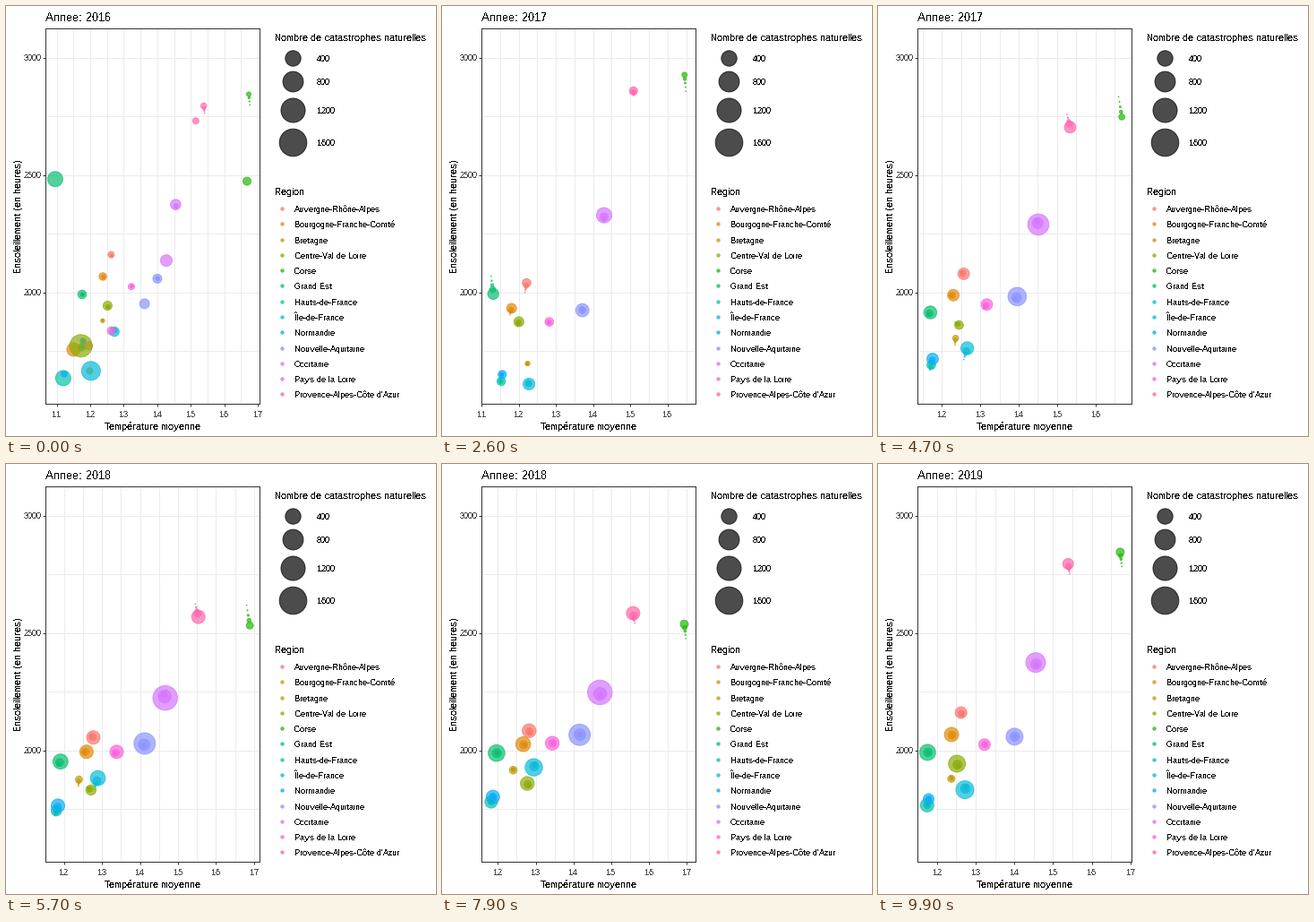
These frames come from a looping animation (480x480 px, 10000 ms). A matplotlib script:

```python
import numpy as np
import matplotlib.pyplot as plt
from matplotlib.animation import FuncAnimation
from matplotlib.ticker import MultipleLocator

SIZE, DPI = 480, 96
PX = 72 / DPI                      # points per pixel
FRAMES, INTERVAL = 100, 100
YEARS = np.arange(2016, 2020)
WAKE = 5                           # shadow length in frames
ALPHA = 0.7
LEFT, RIGHT, TOP, BOTTOM = 44, 283, 25, 444

plt.rcParams.update({
    "font.family": "Liberation Sans",
    "text.hinting": "native",
    "text.hinting_factor": 1,
    "text.antialiased": False,
})

# Key points: temperature (first, peak), sunshine (first three years),
# bubble radius in pixels (first, peak)
REGIONS = {
    "Auvergne-Rhône-Alpes": ((11.95, 12.96), (1773, 2113, 2034), (5, 9)),
    "Bourgogne-Franche-Comté": ((11.5, 12.86), (1757, 1980, 2000), (8, 9)),
    "Bretagne": ((11.98, 12.43), (1666, 1706, 1940), (4, 5)),
    "Centre-Val de Loire": ((11.72, 12.95), (1773, 1903, 1805), (13, 7)),
    "Corse": ((16.68, 17.07), (2474, 3049, 2339), (5, 5)),
    "Grand Est": ((10.95, 12.1), (2483, 1862, 1987), (9, 10)),
    "Hauts-de-France": ((11.19, 11.87), (1635, 1618, 1790), (9, 7)),
    "Île-de-France": ((12.02, 13.1), (1666, 1595, 1990), (11, 10)),
    "Normandie": ((11.22, 11.92), (1653, 1650, 1808), (4, 9)),
    "Nouvelle-Aquitaine": ((13.62, 14.27), (1952, 1917, 2072), (6, 14)),
    "Occitanie": ((14.27, 14.8), (2136, 2381, 2165), (7, 16)),
    "Pays de la Loire": ((12.63, 13.58), (1837, 1885, 2035), (5, 9)),
    "Provence-Alpes-Côte d'Azur": ((15.15, 15.71), (2731, 2893, 2448), (4, 9)),
}


def yearly(temp, sun, radius):
    """Fill in the years between and after the key points."""
    t0, t2 = temp
    t1 = t0 + 0.13 * (14.5 - t0)   # cool regions warm up first
    s0, s1, s2 = sun
    r0, r2 = radius
    return ((t0, t1, t2, (t1 + t2) / 2),
            (s0, s1, s2, 0.6 * s1 + 0.4 * s2 + 80),
            (r0, 0.6 * r2, r2, (r0 + r2) / 2))


# Axes: region, quantity, year
DATA = np.array([yearly(*keys) for keys in REGIONS.values()])


def hue_color(hue, chroma=100, lum=65):
    """Polar CIE-LUV colour as RGBA."""
    h = np.radians(hue)
    u = chroma * np.cos(h) / (13 * lum) + 0.1978
    v = chroma * np.sin(h) / (13 * lum) + 0.4683
    y = ((lum + 16) / 116) ** 3
    xyz = [9 * y * u / (4 * v), y, y * (12 - 3 * u - 20 * v) / (4 * v)]
    rgb = np.clip(np.dot([[3.2406, -1.5372, -0.4986],
                          [-0.9689, 1.8758, 0.0415],
                          [0.0557, -0.2040, 1.0570]], xyz), 0.0031308, 1)
    return (*np.clip(1.055 * rgb ** (1 / 2.4) - 0.055, 0, 1), ALPHA)


COLORS = [hue_color(15 + 360 * i / len(REGIONS)) for i in range(len(REGIONS))]


def area(radius, scale=1.0):
    """Marker area for an outer radius in pixels; the outline never shrinks."""
    inner = 0.354 + (radius - 0.85) * scale
    return (2 * inner * PX) ** 2


fig = plt.figure(figsize=(SIZE / DPI, SIZE / DPI), dpi=DPI, facecolor="white")

# Page in pixel coordinates for titles and legends
page = fig.add_axes([0, 0, 1, 1])
page.set(xlim=(0, SIZE), ylim=(SIZE, 0))
page.axis("off")


def label(x, y, text, px, **kw):
    return page.text(x, y, text, fontsize=px * PX, va="baseline", **kw)


def dots(ax, x, y, s, colors, **kw):
    return ax.scatter(x, y, s=s, facecolors=colors, edgecolors=colors,
                      linewidths=PX, **kw)


title = label(44, 17, "", 13)
label(163.5, 473, "Température moyenne", 11, ha="center")
label(17, 235, "Ensoleillement (en heures)", 11, ha="center", rotation=90,
      rotation_mode="anchor")

label(300, 39, "Nombre de catastrophes naturelles", 11)
y = 57.5
for count in range(400, 2000, 400):
    r = 0.33 * count ** 0.5 + 2.6
    dots(page, [320], [y], area(r), [(0, 0, 0, ALPHA)])
    label(347, y + 4.5, str(count), 9)
    y += 2 * r + 8

label(300, 211, "Region", 11)
for i, (name, color) in enumerate(zip(REGIONS, COLORS)):
    y = 226 + 17.28 * i
    dots(page, [308], [y], area(2.2), [color])
    label(322, y + 4, name, 9)

# Plot panel
panel = fig.add_axes([LEFT / SIZE, 1 - BOTTOM / SIZE,
                      (RIGHT - LEFT) / SIZE, (BOTTOM - TOP) / SIZE])
panel.set_ylim(1526, 3125)
panel.set_axisbelow(True)
for axis, step in [(panel.xaxis, 1), (panel.yaxis, 500)]:
    axis.set_major_locator(MultipleLocator(step))
    axis.set_minor_locator(MultipleLocator(step / 2))
panel.grid(which="both", color="#EBEBEB", linewidth=PX)
panel.tick_params(which="major", length=2.75 * PX, width=PX, color="#333333",
                  labelcolor="#4D4D4D", labelsize=9 * PX)
panel.tick_params(which="minor", length=0)
panel.tick_params(axis="x", pad=5 * PX)
panel.tick_params(axis="y", pad=2 * PX)
for spine in panel.spines.values():
    spine.set(color="#333333", linewidth=PX)

n = len(REGIONS) * WAKE
bubbles = dots(panel, np.zeros(n), np.zeros(n), np.ones(n), COLORS * WAKE,
               zorder=2)


def state(t):
    """Temperature, sunshine and radius of every region at t years."""
    k = min(int(t), len(YEARS) - 2)
    a, b = DATA[:, :, k], DATA[:, :, k + 1]
    return (a + (b - a) * (t - k)).T


def update(i):
    points, sizes = [], []
    for lag in reversed(range(WAKE)):      # oldest shadow first, current last
        t = (i - lag) % FRAMES / (FRAMES - 1) * (len(YEARS) - 1)
        temp, sun, radius = state(t)
        points.append(np.column_stack([temp, sun]))
        sizes.append(area(radius, (1 - lag / WAKE) ** 3))
    points = np.concatenate(points)
    bubbles.set_offsets(points)
    bubbles.set_sizes(np.concatenate(sizes), fig.dpi)

    xs = points[:, 0]
    margin = 0.05 * np.ptp(xs)
    panel.set_xlim(xs.min() - margin, xs.max() + margin)
    title.set_text(f"Annee: {int(YEARS[0] + t + 0.5)}")
    return bubbles, title


anim = FuncAnimation(fig, update, frames=FRAMES, interval=INTERVAL,
                     repeat=True, repeat_delay=0, blit=False)
plt.show()
```
